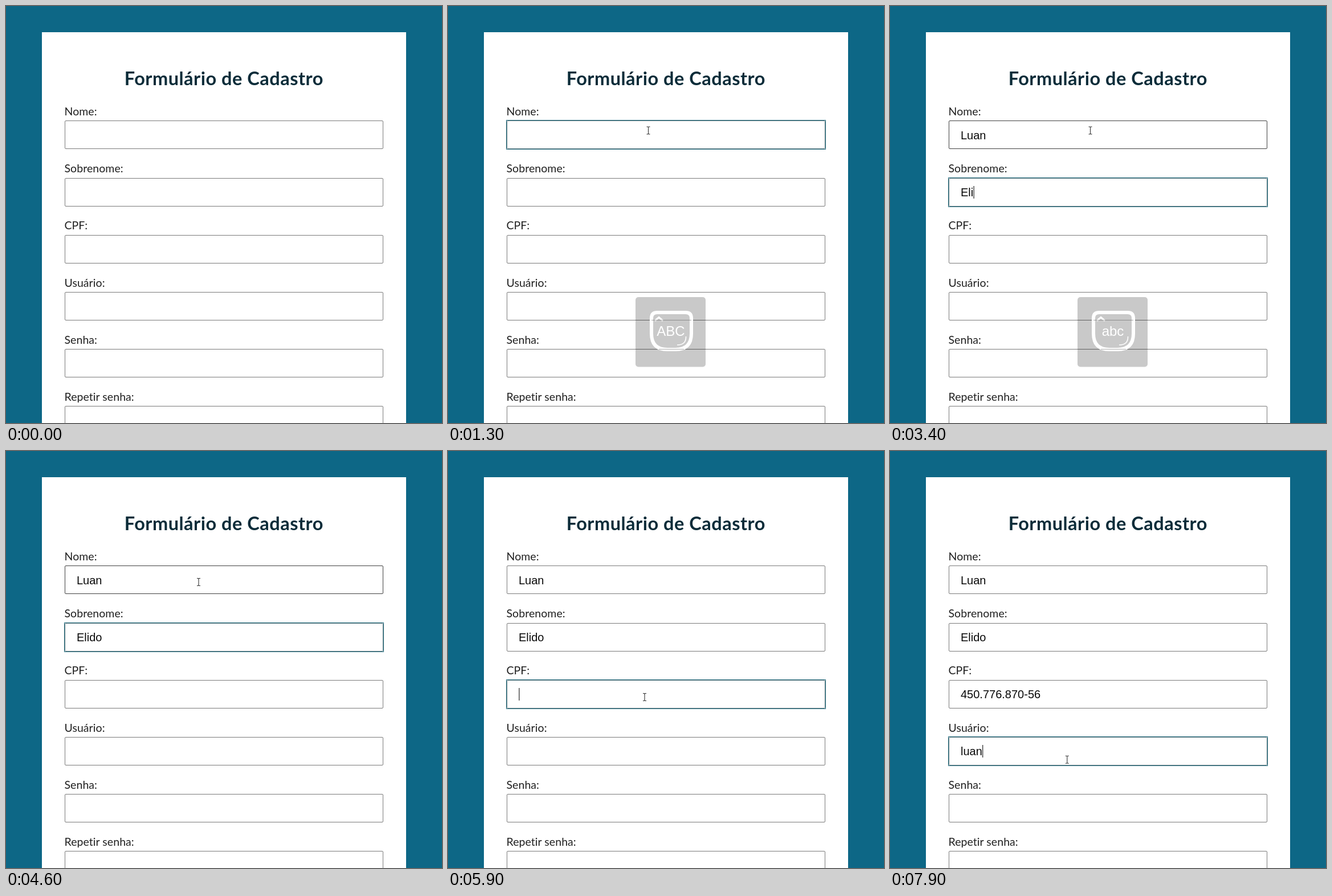
Write an HTML page that moves like this. It is 765x732 px and loops after 8000 ms.

```html
<!DOCTYPE html>
<html lang="pt-BR">
<head>
<meta charset="utf-8">
<title>Formulário de Cadastro</title>
<style>
  html, body { margin: 0; width: 100%; height: 100%; overflow: hidden; background: #0d6786; }
  svg { display: block; width: 765px; height: 732px; }
  text { font-variant-ligatures: none; }
  .title { font: 700 32.5px Lato, sans-serif; letter-spacing: .5px; fill: #0b2c39; text-anchor: middle; }
  .label { font: 400 19.5px Lato, sans-serif; letter-spacing: .06px; fill: #202020; }
  .value { font: 20px "Liberation Sans", Arial, sans-serif; fill: #0a0a0a; }
  .box { fill: #fff; stroke: #7a7a7a; }
  .box.hover { stroke: #404040; }
  .box.focus { stroke: #5a747c; }
  .ring { fill: none; stroke: #2b7283; }
  .caps text { font: 24px "Liberation Sans", Arial, sans-serif; fill: #fff; text-anchor: middle; }
  .caps path { fill: none; stroke: #fff; }
</style>
</head>
<body>
<svg viewBox="0 0 765 732">
  <rect width="765" height="732" fill="#0d6786"/>
  <rect x="63" y="46" width="639" height="690" fill="#fff"/>
  <text class="title" x="382.3" y="138.800">Formulário de Cadastro</text>
  <g id="fields"></g>
  <rect id="caret" y="316" width="1.2" height="22" fill="#222"/>
  <g id="caps" class="caps">
    <rect x="329" y="511" width="123" height="122.5" rx="5" fill="#000" fill-opacity=".21"/>
    <path d="M367 538H417Q427 538 427 548V575Q427 603 399 603H385Q357 603 357 575V548Q357 538 367 538Z" stroke-width="6"/>
    <path d="M363 552.5L370 546.5L377 552.5" stroke-width="3"/>
    <path d="M417.500 580Q418 595 402 595" stroke-width="1.6"/>
    <path d="M357 551.5H427M370 602.5H414" style="stroke:#999" stroke-width=".8"/>
    <text id="capsText" x="391" y="578.500">abc</text>
  </g>
  <path id="arrow" d="M.5 .5V16.500L4 13.300L6.700 19.500L9.300 18.400L6.700 12.300H11.500Z" fill="#fff" stroke="#111" stroke-width="1.2"/>
  <path id="beam" d="M-3 -6.500H-1L0 -5.500L1 -6.500H3M0 -5.500V5.500M-3 6.500H-1L0 5.500L1 6.500H3" fill="none" stroke="#333" stroke-width="1.1"/>
</svg>
<script>
const LOOP = 8000, STEP = 100, BLINK = 500;
const $ = id => document.getElementById(id);

// Each field: label and the moments (ms) at which its value changes
const fields = [
  { label: 'Nome:', typed: [[1500, 'L'], [1700, 'Lu'], [1800, 'Lua'], [1900, 'Luan']] },
  { label: 'Sobrenome:', typed: [[2900, 'E'], [3300, 'El'], [3400, 'Eli'], [3600, 'Elid'], [3700, 'Elido']] },
  { label: 'CPF:', typed: [[6000, '450.776.870-56']] },
  { label: 'Usuário:', typed: [[7400, 'l'], [7500, 'lu'], [7700, 'lua'], [7800, 'luan']] },
  { label: 'Senha:', typed: [] },
  { label: 'Repetir senha:', typed: [] }
];
const focusAt = [[0, -1], [800, 0], [2000, 1], [5500, 2], [6700, 3]];
const capsAt = [[0, ''], [1300, 'ABC'], [1600, 'abc'], [2700, 'ABC'], [3100, 'abc'], [4300, '']];
const mouse = [
  [0, 800, 640], [100, 740, 590], [300, 480, 444], [500, 377, 332], [600, 353, 222],
  [700, 351.5, 218.5], [4200, 351.5, 218.5], [4600, 338, 230], [5000, 358, 400],
  [5200, 361, 459], [5400, 345, 432], [6000, 345, 432], [6600, 310.8, 541.8]
];

function add(tag, cls, attrs) {
  const el = document.createElementNS('http://www.w3.org/2000/svg', tag);
  el.setAttribute('class', cls);
  for (const k in attrs) el.setAttribute(k, attrs[k]);
  return $('fields').appendChild(el);
}

fields.forEach((f, i) => {
  const y = 201.8 + i * 100.2;
  f.top = Math.floor(y);
  add('text', 'label', { x: 102.5, y: y - 9.8 }).textContent = f.label;
  f.box = add('rect', 'box', { x: 103.5, y: f.top + .5, width: 558, height: 49, rx: 1.5 });
  f.ring = add('rect', 'ring', { x: 102.5, y: f.top - .5, width: 560, height: 51 });
  f.text = add('text', 'value', { x: 124, y: y + 32 });
});

const latest = (list, t) => list.filter(e => e[0] <= t).pop();

function mouseAt(t) {
  const i = mouse.findIndex(p => p[0] > t);
  if (i < 0) return mouse[mouse.length - 1].slice(1);
  if (i === 0) return mouse[0].slice(1);
  const [a, b] = [mouse[i - 1], mouse[i]];
  const k = (t - a[0]) / (b[0] - a[0]);
  return [a[1] + (b[1] - a[1]) * k, a[2] + (b[2] - a[2]) * k];
}

const fieldAt = ([x, y]) =>
  fields.findIndex(f => x > 103 && x < 662 && y > f.top && y < f.top + 50);

function show(el, on) { el.style.display = on ? '' : 'none'; }

function draw(t) {
  const [since, focus] = latest(focusAt, t);
  const hover = fieldAt(mouseAt(t - STEP));
  fields.forEach((f, i) => {
    f.box.setAttribute('class', 'box' + (i === focus ? ' focus' : i === hover ? ' hover' : ''));
    show(f.ring, i === focus);
    f.text.textContent = (latest(f.typed, t) || [0, ''])[1];
  });

  const f = fields[focus];
  let caretOn = false;
  if (f) {
    // Blinking restarts with focus and with every edit
    const [edited, value] = latest(f.typed, t) || [since, ''];
    caretOn = Math.floor((t - Math.max(since, edited)) / BLINK) % 2 === 0;
    const width = value ? f.text.getComputedTextLength() : 0;
    $('caret').setAttribute('x', 124.3 + width);
    $('caret').setAttribute('y', f.top + 14);
  }
  show($('caret'), caretOn);

  const caps = latest(capsAt, t)[1];
  show($('caps'), caps);
  $('capsText').textContent = caps;

  const pos = mouseAt(t), inField = fieldAt(pos) >= 0;
  for (const id of ['arrow', 'beam']) {
    $(id).setAttribute('transform', `translate(${pos})`);
    show($(id), (id === 'beam') === inField);
  }
}

const start = performance.now();
function tick(now) {
  const t = Math.max(0, now - start) % LOOP;
  draw(Math.floor(t / STEP) * STEP);
  requestAnimationFrame(tick);
}
draw(0);
requestAnimationFrame(tick);
</script>
</body>
</html>
```
